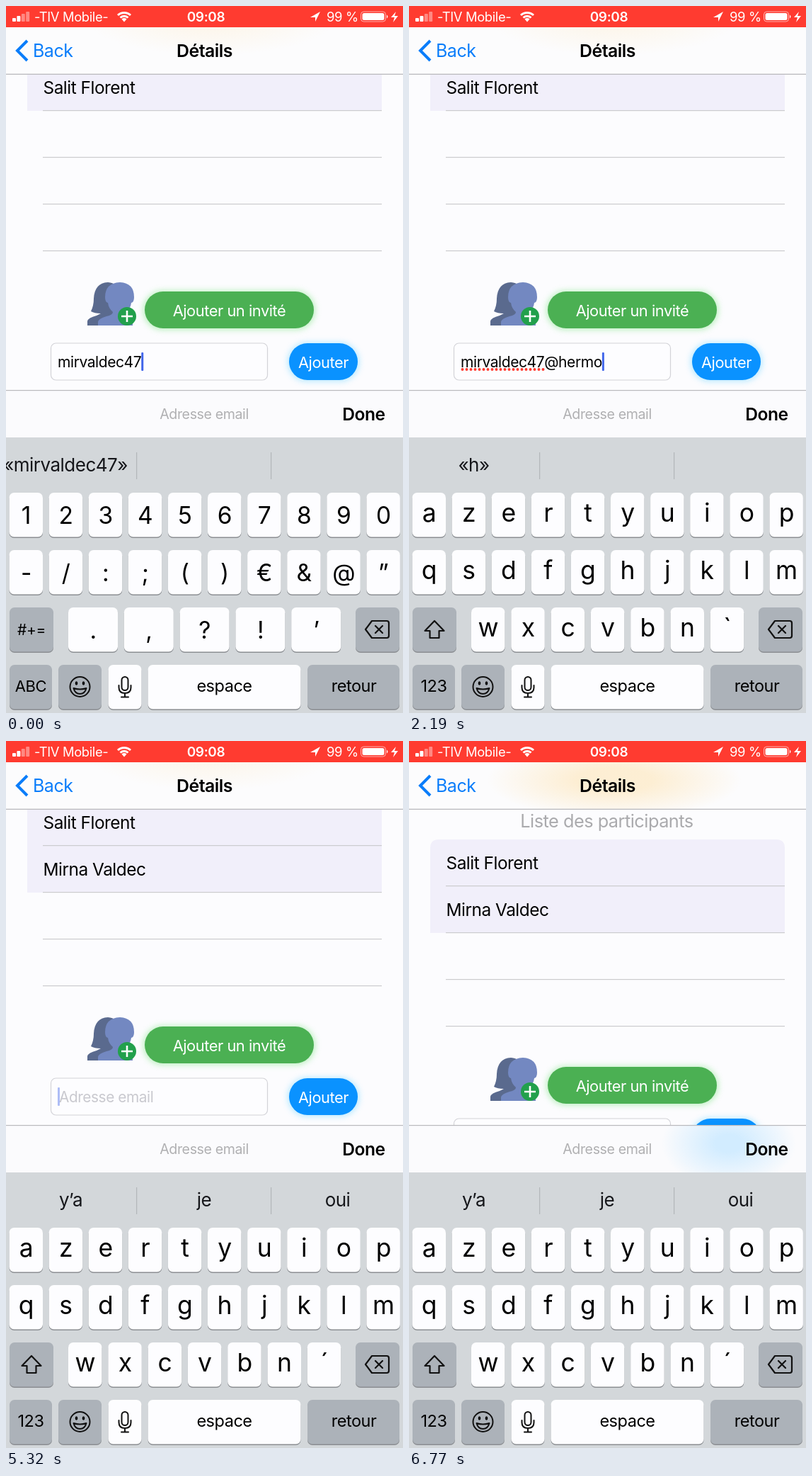
Animation of 561x998 px, one loop 6840 ms. Source, as an HTML page:

```html
<!DOCTYPE html>
<html lang="fr">
<head>
<meta charset="utf-8">
<style>
html, body { margin: 0; height: 100%; overflow: hidden; background: #fcfcfe; }
svg { display: block; width: 100vw; height: 100vh; }
text { font-family: Inter, "Noto Sans", sans-serif; letter-spacing: -.02em; white-space: pre; }
.glow { filter: blur(4px); opacity: .8; }
.pop { filter: drop-shadow(0 2px 4px rgba(0, 0, 0, .3)); }
</style>
</head>
<body>
<svg viewBox="0 0 561 998" preserveAspectRatio="none">
  <defs>
    <clipPath id="page"><rect y="97" width="561" height="446"/></clipPath>
    <clipPath id="nav"><rect y="30" width="561" height="66"/></clipPath>
    <clipPath id="bar"><rect y="543" width="561" height="66"/></clipPath>
    <radialGradient id="sun"><stop offset=".3" stop-color="#fdeccd"/><stop offset="1" stop-color="#fdeccd" stop-opacity="0"/></radialGradient>
    <radialGradient id="sky"><stop offset=".2" stop-color="#d2ecff"/><stop offset="1" stop-color="#d2ecff" stop-opacity="0"/></radialGradient>
  </defs>
  <g id="scene"></g>
</svg>
<script>
const LOOP = 6840, USER = 'mirvaldec47';
const SWITCH = { letters: 60, numbers: 2670, back: 3120 };
const SENT = 4760;

// character, finger down, finger up
const TAPS = [
  ['h', 1360, 1450], ['e', 1510, 1580], ['r', 1640, 1720], ['m', 1790, 1870], ['o', 2040, 2110],
  ['l', 2210, 2290], ['i', 2370, 2450], ['.', 2820, 2890], ['f', 3590, 3660], ['r', 3770, 3840]
];
// start time and the three words offered from then on
const HINTS = [
  [0, `«${USER}»`], [60, 'a', 'pas', 'est'], [1450, '«h»'], [2520, '«hermoli»'],
  [2890], [3660, '«f»'], [4070, '«fr»'], [SENT, 'y’a', 'je', 'oui']
];
const ACCENTS = { '': '´', e: '´', o: '`' };

const scene = document.getElementById('scene');
const pen = document.createElement('canvas').getContext('2d');
const FIELD_SIZE = 21;
function textWidth(s) {
  pen.font = `${FIELD_SIZE}px Inter, "Noto Sans", sans-serif`;
  return pen.measureText(s).width - s.length * FIELD_SIZE * .02;
}

const clamp = v => Math.max(0, Math.min(1, v));
const escape = s => s.replace(/&/g, '&amp;').replace(/</g, '&lt;');
const text = (x, y, size, s, attr = '') => `<text x="${x}" y="${y}" font-size="${size}" ${attr}>${escape(s)}</text>`;
const mid = (x, y, size, s, attr = '') => text(x, y, size, s, 'text-anchor="middle" ' + attr);
const rect = (x, y, w, h, fill, r = 0, attr = '') =>
  `<rect x="${x}" y="${y}" width="${w}" height="${h}" rx="${r}" fill="${fill}" ${attr}/>`;
const path = (d, attr) => `<path d="${d}" ${attr}/>`;
const line = (d, color, w, attr = '') => path(d, `fill="none" stroke="${color}" stroke-width="${w}" ${attr}`);
const bold = 'font-weight="600"', white = 'fill="#fff"', round = 'stroke-linecap="round" stroke-linejoin="round"';

function typedAt(t) {
  if (t >= SENT) return '';
  return USER + (t >= 60 ? '@' : '') + TAPS.filter(k => t >= k[2]).map(k => k[0]).join('');
}

function statusBar() {
  const bars = [0, 1, 2, 3].map(i => rect(9 + 6.4 * i, 17 - 3 * i, 5, 5 + 3 * i, '#fff', 1, `opacity="${i < 2 ? 1 : .4}"`));
  return rect(0, 0, 561, 30, '#ff3b30') + bars.join('') +
    text(40, 22, 18.4, '-TIV Mobile-', white) +
    line('M158 13a13 13 0 0 1 18 0M161.500 16.500a8 8 0 0 1 11 0', '#fff', 3) +
    path('M167 22.500l-3.500-4a5 5 0 0 1 7 0z', white) +
    mid(282.5, 22, 19, '09:08', white + bold) +
    path('M430 16l14-8-7 14v-6z', white) + text(453, 22, 18.5, '99 %', white) +
    rect(501.5, 8, 35, 14, 'none', 4, 'stroke="#fff" stroke-opacity=".6"') + rect(503.5, 10, 31, 10, '#fff', 2.5) +
    path('M538 12.500q3 2.500 0 5z', white) + path('M551 8l-7 8h5l-2 7 7-9h-5z', white);
}

function navBar(s) {
  return rect(0, 30, 561, 66, '#fcfcfd') +
    `<ellipse cx="290" cy="${15 + s * .7}" rx="180" ry="55" fill="url(#sun)" opacity="${.35 + s / 110}" clip-path="url(#nav)"/>` +
    rect(0, 95.7, 561, 1.2, '#b4b4b7') +
    line('M30 49L16 63l14 14', '#0a7dfa', 4) +
    text(38, 71.500, 25, 'Back', 'fill="#0a7dfa"') + mid(280.5, 71.500, 24.8, 'Détails', bold);
}

function guestIcon() {
  return path('M115 451v-6q1-5 13-8l6-3q-9 0-14-3 4-8 4-18 1-22 20-23 14 1 16 14v47z', 'fill="#5a6a8e"') +
    path('M130 451v-5q1-5 12-8 9-2 9-6-6-5-7-13-4-1-4-8 0-20 21-21 20 1 20 21 0 7-4 8-1 8-7 13 0 4 9 6v13z', 'fill="#7388c1"') +
    '<circle cx="171" cy="438" r="13" fill="#22a04c"/>' + line('M163 438h16M171 430v16', '#fff', 2.6);
}

function pill(x, y, w, color, glow, label, size) {
  return rect(x - 2, y - 1, w + 4, 55, glow, 27, 'class="glow"') + rect(x, y, w, 52, color, 26) +
    mid(x + w / 2, y + 34.5, size, label, white);
}

function field(t) {
  const typed = typedAt(t);
  const fade = start => clamp((t - start) / 245);
  const caret = 1 - fade(260) + fade(760) - fade(4340) + (t >= SENT) - fade(5180) + fade(5680);
  let out = rect(63.5, 476, 306, 52, '#fdfdff', 7, 'stroke="#d3d3d8" stroke-width="1.2"');
  out += typed ? text(73, 510, FIELD_SIZE, typed) : text(75, 510, 20.8, 'Adresse email', 'fill="#c9c9cf"');
  if (typed.includes('@'))
    out += line(`M75.500 513H${73 + textWidth(USER)}`, '#ff3b30', 4, 'stroke-linecap="round" stroke-dasharray="0 6"');
  return out + rect(73 + textWidth(typed), 489, 3, 26, '#4266ea', 1, `opacity="${clamp(caret)}"`);
}

function page(t, s) {
  const names = ['Salit Florent', ...(t >= SENT ? ['Mirna Valdec'] : [])];
  const bottom = 82 + 66 * names.length;
  let out = mid(279.5, 65, 25.3, 'Liste des participants', 'fill="#aaaaad"');
  out += path(`M30 ${bottom}V94q0-12 12-12H519q12 0 12 12V${bottom}z`, 'fill="#f1effa"');
  for (let i = 0; i < 4; i++) out += rect(52, 147 + 66 * i, 479, 1.2, '#cbcbce');
  names.forEach((n, i) => out += text(52.5, 123.5 + 66 * i, 24.4, n));
  out += guestIcon() + pill(196, 403, 239, '#4bb053', '#a9ecae', 'Ajouter un invité', 21.8) +
    field(t) + pill(400, 476, 97, '#0a92ff', '#a5e4ff', 'Ajouter', 21.8);
  const thumb = clamp((t - 5880) / 80) - clamp((t - 6430) / 280);
  return `<g clip-path="url(#page)"><g transform="translate(0 ${s})">${out}</g>` +
    rect(553, 325 - s * .42, 3.6, 214, '#99999d', 1.8, `opacity="${thumb}"`) + '</g>';
}

function accessory(s) {
  return rect(0, 543, 561, 66, '#fbfbfd') +
    `<ellipse cx="452" cy="568" rx="95" ry="62" fill="url(#sky)" opacity="${(s / 57) ** 2}" clip-path="url(#bar)"/>` +
    rect(0, 542, 561, 1.2, '#b9b9bc') +
    mid(280, 583, 19.6, 'Adresse email', 'fill="#b0b0b2"') + mid(505.5, 585, 24.6, 'Done', bold);
}

function hints(t) {
  const words = HINTS.filter(h => t >= h[0]).pop().slice(1);
  return words.map((w, i) => mid(w.length > 10 ? 84 : 91.5 + 188.5 * i, 657, 26, w, 'fill="#15161a"')).join('') +
    rect(184, 630, 1.2, 38, '#b2b6ba') + rect(374, 630, 1.2, 38, '#b2b6ba');
}

const key = (x, y, w, fill = '#fdfdff') => rect(x, y + 1.6, w, 62.5, '#8b8e92', 7) + rect(x, y, w, 62.5, fill, 7);

function layout(numbers, accent) {
  const rows = numbers ? ['1234567890', '-/:;()€&@”', '.,?!’'] : ['azertyuiop', 'qsdfghjklm', 'wxcvbn' + accent];
  return rows.flatMap((row, r) => [...row].map((c, i) => {
    const wide = numbers && r == 2;
    return { c, x: r < 2 ? 4.5 + 56.1 * i : 88 + (wide ? 78.8 : 56.3) * i, y: 687 + 81 * r, w: wide ? 70 : 47.5 };
  }));
}

function popup({ c, x, y, w }) {
  const l = Math.max(3, x - 19), r = Math.min(558, x + w + 19), top = y - 98;
  const d = `M${l} ${top + 13}q0-13 13-13H${r - 13}q13 0 13 13V${y - 38}C${r} ${y - 16} ${x + w} ${y - 20} ${x + w} ${y + 4}` +
    `V${y + 56}q0 7-7 7H${x + 7}q-7 0-7-7V${y + 4}C${x} ${y - 20} ${l} ${y - 16} ${l} ${y - 38}z`;
  return path(d, 'fill="#fdfdff" class="pop"') + mid((l + r) / 2, y - 35, 52, c, 'font-weight="350"');
}

function keyboard(t) {
  const numbers = t < SWITCH.letters || t >= SWITCH.numbers && t < SWITCH.back;
  const accent = ACCENTS[typedAt(t).slice(-1)] || '’';
  const keys = layout(numbers, accent), dark = '#acb2b9';
  const flash = t >= 2600 && t < SWITCH.numbers || t >= 3090 && t < SWITCH.back;
  let out = rect(0, 609, 561, 389, '#d3d7da') + hints(t);
  for (const k of keys)
    out += key(k.x, k.y, k.w) + mid(k.x + k.w / 2, k.y + (numbers ? 44 : 41), numbers ? 33.5 : 35.5, k.c);

  out += key(5, 849, 62, dark) + key(494, 849, 62, dark);
  out += numbers ? mid(36, 888, 21, '#+=')
    : line('M36 868L22.500 882h7v10h13v-10h7z', '#111', 2.2, round);
  out += line('M517 868h21q3 0 3 3v18q0 3-3 3h-21l-9-12zM522 875l10 10M532 875l-10 10', '#111', 2.2, round);

  out += key(5, 930, 60, flash ? '#fdfdff' : dark) + mid(35, 968, numbers ? 22 : 23.5, numbers ? 'ABC' : '123');
  out += key(74, 930, 61, dark) + '<circle cx="104.500" cy="961" r="14" fill="none" stroke="#111" stroke-width="2"/>' +
    '<ellipse cx="99.500" cy="956" rx="1.800" ry="2.800"/><ellipse cx="109.500" cy="956" rx="1.800" ry="2.800"/>' +
    line('M95.500 963q9 3 18 0-2 8-9 8t-9-8z', '#111', 2, round);
  out += key(144.5, 930, 47) + rect(163.5, 947, 9, 19, 'none', 4.5, 'stroke="#111" stroke-width="2"') +
    line('M159.500 959v3q0 8 8.500 8t8.500-8v-3M168 970v5M163 975.500h10', '#111', 2, round);
  out += key(200.5, 930, 216) + mid(308.5, 968, 23.5, 'espace') + key(426, 930, 130, dark) + mid(491.5, 968, 23.5, 'retour');

  const tap = TAPS.find(k => t >= k[1] && t < k[2]);
  return out + (tap ? popup(keys.find(k => k.c == tap[0])) : '');
}

let last = '';
function draw(now) {
  const t = now % LOOP;
  const p = clamp((t - 5890) / 470), s = 57 * p * p * (3 - 2 * p);
  const next = page(t, s) + navBar(s) + statusBar() + accessory(s) + keyboard(t);
  if (next != last) scene.innerHTML = last = next;
}

const start = performance.now();
function tick() {
  draw(performance.now() - start);
  requestAnimationFrame(tick);
}
tick();
</script>
</body>
</html>
```
